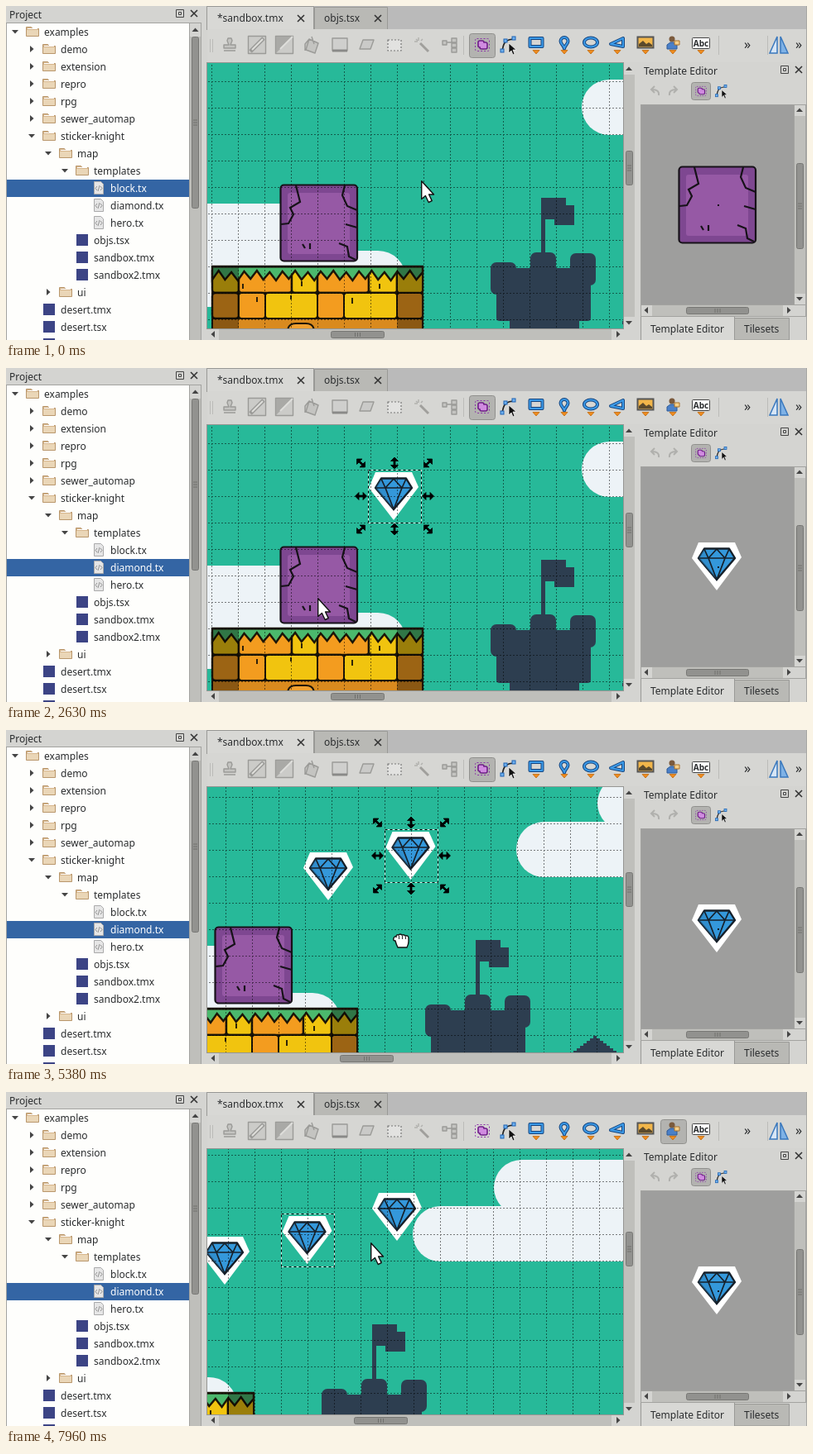
Write an HTML page that moves like this. It is 967x404 px and loops after 8000 ms.

```html
<!DOCTYPE html>
<html lang="en">
<head>
<meta charset="utf-8">
<title>Template drag and drop</title>
<style>
html, body { margin: 0; width: 100%; height: 100%; overflow: hidden; background: #d4d4d1; }
svg { display: block; width: 967px; height: 404px; }
text { font: 12px "Noto Sans", sans-serif; fill: #2a2c2e; white-space: pre; }
</style>
</head>
<body>
<svg id="stage" viewBox="0 0 967 404" xmlns="http://www.w3.org/2000/svg"></svg>
<script>
const LOOP = 8000;
const stage = document.getElementById('stage');

// Markup helpers
const rect = (x, y, w, h, fill, more = '') =>
  `<rect x="${x}" y="${y}" width="${w}" height="${h}" fill="${fill}" ${more}/>`;
const path = (d, fill = 'none', stroke = 'none', width = 1, more = '') =>
  `<path d="${d}" fill="${fill}" stroke="${stroke}" stroke-width="${width}" ${more}/>`;
const text = (x, y, s, more = '') => `<text x="${x}" y="${y}" ${more}>${s}</text>`;
const at = (x, y, body, size = 1) => `<g transform="translate(${x} ${y}) scale(${size})">${body}</g>`;
const tag = (id, body, more = '') => `<g id="${id}" ${more}>${body}</g>`;
const round = r => `rx="${r}"`;
const joined = 'stroke-linejoin="round"';

// Window chrome
const TROUGH = '#bfbfbb', STRIP = '#bababa', IDLE = '#b9b9b5';
const cross = (x, y) => path(`M${x - 4} ${y - 4}l8 8m0-8l-8 8`, 'none', '#333', 1.6);
const floatIcon = (x, y) => path(`M${x - 4.5} ${y - 4.5}h9v9h-9zM${x - 1.5} ${y - 1.5}h3v3h-3z`, 'none', '#444');
const chevron = (x, y, turn) =>
  path('M-4 2L0-2.5L4 2Z', '#444', 'none', 1, `transform="translate(${x} ${y}) rotate(${turn})"`);

function slider(x, y, w, h) {
  const cx = x + w / 2, cy = y + h / 2;
  const grip = [-3, 0, 3].map(d => w > h ? `M${cx + d} ${cy - 2.5}v5` : `M${cx - 2.5} ${cy + d}h5`).join('');
  return rect(x + .5, y + .5, w - 1, h - 1, '#92928f', 'rx="2" stroke="#777774"') + path(grip, 'none', '#70706d');
}

const folder = (x, y) => at(x, y,
  path('M-7.5-5.5h6l1.5 2h7.5v9h-15z', '#d6b68d', '#b9976c') +
  rect(-7, -2, 14, 7, '#ead6b7') + path('M-6-3.5h12', 'none', '#fff'));
const page = (x, y) => at(x, y,
  path('M-5.5-7.5h8l3 3v12h-11z', '#e6e6e6', '#aaa') +
  path('M-2-2l-2 2.5l2 2.5M2-2l2 2.5l-2 2.5M1-3l-2 7', 'none', '#888', .9));
const mapIcon = (x, y) => rect(x - 7, y - 7, 14, 14, '#3c4485');

const rows = [
  [0, 'examples', 'open'], [1, 'demo', 'shut'], [1, 'extension', 'shut'], [1, 'repro', 'shut'],
  [1, 'rpg', 'shut'], [1, 'sewer_automap', 'shut'], [1, 'sticker-knight', 'open'], [2, 'map', 'open'],
  [3, 'templates', 'open'], [4, 'block.tx'], [4, 'diamond.tx'], [4, 'hero.tx'], [3, 'objs.tsx'],
  [3, 'sandbox.tmx'], [3, 'sandbox2.tmx'], [2, 'ui', 'shut'], [1, 'desert.tmx'], [1, 'desert.tsx'], [1, '']
];

function treeRow([level, name, state], i) {
  const y = 31 + 21 * i, x = 32 + 20 * level;
  const icon = state ? folder : name.endsWith('.tx') ? page : mapIcon;
  return (state ? chevron(x - 21, y, state === 'open' ? 180 : 90) : '') +
    icon(x, y) + text(x + 14, y + 4.5, name, `id="row${i}"`);
}

const project =
  text(4, 15, 'Project') + floatIcon(210, 9) + cross(227, 9) +
  rect(0, 20, 236, 390, '#a3a3a0') + rect(1, 21, 220, 390, '#fefefc') +
  rect(1, 210, 220, 21, '#3465a4', 'id="mark"') + rows.map(treeRow).join('') +
  rect(222, 21, 13, 390, TROUGH) + rect(222, 21, 13, 16, '#d4d4d1') +
  chevron(228.5, 29, 0) + slider(224, 37, 9, 208);

// Toolbar icons, centred on 0,0
const drop = path('M-4 6.5h8l-4 4.5z', '#f08c1e', '#c06a10', .8);
const blue = d => path(d, '#d6d6d3', '#15457f', 4, joined) + path(d, 'none', '#3b9ae8', 2, joined);
const selectIcon =
  rect(-8.5, -7.5, 17, 15, 'none', 'rx="2" stroke="#8a2fa8" stroke-dasharray="2 2"') +
  path('M-5-3q0-2 2-2h3q2 0 2 2h2q2 0 2 2v4q0 2-2 2h-5q-2 0-2-2q-2 0-2-2z', '#d08be0', '#6d1f86', 1.6);
const nodeIcon =
  path('M-8 9C-7-4-3-7 8-7', 'none', '#222', 1.6) +
  [[-8, 7], [-4, -5], [6, -8]].map(([x, y]) => rect(x - 2, y - 2, 4, 4, '#6fb1ee', 'stroke="#1e63b4"')).join('') +
  path('M0-2v12l3-3l2 5l2-1l-2-5h4z', '#111', '#fff', .7);
const gray = (d, fill = '#c4c4c1') => path(d, fill, '#9b9b98', 1.4, joined);
const tools = [
  [270, gray('M-2-8h4l1 3l-2 5h6v4h-14v-4h6l-2-5zM-7 7h14')],
  [303, gray('M-10.5-10.5h21v21h-21z', '#cbcbc8') + path('M-8 8L8-8', 'none', '#9b9b98', 5) +
    path('M-6 6L7-7', 'none', '#dededb', 2)],
  [336, gray('M-10.5-10.5h21v21h-21z', '#cbcbc8') + path('M-10 10V-10H10Z', '#a9a9a6') +
    path('M-5 5L10-10', 'none', '#dededb', 2)],
  [370, gray('M-4-7l11 5l-4 12l-11-4zM-4-7l-5 6v8M-1-10l3 9')],
  [403, gray('M-9-8h18v15h-18z', '#cfcfcd') + path('M-9 7h18', 'none', '#8a8a88', 3)],
  [436, gray('M-5-6h13l-4 11h-13z', '#cacac8')],
  [469, path('M-8-6h16v13h-16z', '#e2e2e0', '#777', 1.2, 'stroke-dasharray="2 2"')],
  [502, path('M-2-2L8 8', 'none', '#a09f9c', 3) + path('M-4-9v4M-9-4h4M-7-7l2 2M1-7l-2 2', 'none', '#b2b2af', 1.5)],
  [536, gray('M-9-5h5v5h-5zM2-8h6v5h-6zM2-2h6v5h-6zM2 4h6v5h-6zM-4-3h6')],
  [575, selectIcon], [607, nodeIcon],
  [640, blue('M-7.5-8h15v10h-15z') + drop],
  [674, blue('M0 4.5C-1 0-4.5-1-4.5-4.5a4.5 4.5 0 0 1 9 0C4.5-1 1 0 0 4.5z') + drop],
  [706, blue('M-8-3a8 5.5 0 1 0 16 0a8 5.5 0 1 0-16 0z') + drop],
  [738, blue('M-8-1L7-8v10z') + drop],
  [772, rect(-9.5, -9.5, 19, 13, '#f2b64a', 'stroke="#555" stroke-width="2"') +
    path('M-8 2v-3l5-4l4 4l3-2l4 3v2z', '#5b4a2c') + drop],
  [805, '<circle cx="-1" cy="-7" r="3.5" fill="#7b5a3c"/>' + path('M-7 5v-5l4-3h4l4 3v5z', '#4a80c8', '#2f5a96') +
    path('M2-5h6v5h-6z', '#f5d08a', '#a8702a') + drop],
  [839, rect(-10.5, -8.5, 21, 13, '#fff', 'rx="1" stroke="#444"') +
    text(0, 1.5, 'Abc', 'text-anchor="middle" style="font-size:10px;font-weight:700"') + drop],
  [933, path('M-2-10v20h-9z', '#d7e6f6', '#3a78bd', 1.5) + path('M2-10v20h9z', '#7fb2e6', '#3a78bd', 1.5)]
];
const pressed = (id, x) => rect(x + .5, 33.5, 31, 29, '#b3b3b0', `id="${id}" rx="3" stroke="#90908d"`);

const header =
  rect(242, 0, 725, 28, STRIP) + path('M372.5 28V1.5h88V28', IDLE, '#999996') +
  path('M242 28.5h725', 'none', '#a8a8a5') + path('M242.5 29V.5h129V29', '#d8d8d5', '#999996') +
  rect(243, 28, 724, 40, '#d6d6d3') +
  text(255, 19, '*sandbox.tmx') + cross(356, 15) + text(384, 19, 'objs.tsx') + cross(449, 15) +
  path('M552.5 36v23M860.5 36v23M919.5 36v23M246.5 40v16M249.5 40v16', 'none', '#bbbbb8') +
  pressed('selectOn', 559) + pressed('templateOn', 790) +
  tools.map(([x, body]) => at(x, 47, body)).join('') +
  text(891, 52, '»', 'style="font-size:16px"') + text(953, 52, '»', 'style="font-size:16px"');

// Scene parts
const block =
  rect(331.5, 216.5, 92.5, 92, '#7e4791', 'rx="4" stroke="#171219" stroke-width="2.2"') +
  rect(340, 226, 75, 74, '#9659a5', round(3)) +
  path('M350 217l5 20l-12 7l4 8l-6 11l-9 1M409 217l-3 12l6 13l12 5M410 264l14 4M402 287l10 4l2 12l8 4' +
    'M358 288l3 5M367 287v7', 'none', '#171219', 2.2);

const diamond =
  path('M8 3H52L60 21L30 61L0 22Z', '#fff') +
  path('M15 10.5H45L52 22L30 48L8 22Z', '#3498db', '#16202a', 2.4, joined) +
  path('M15 11L30 48L8 22Z', '#2b83c2', 'none', 1, 'opacity=".5"') +
  path('M8 22H52M15 11l5 11L30 11l10 11l5-11M20 22l10 26l10-26', 'none', '#16202a', 1.7);

function ground() {
  const orange = '#f39c1f', yellow = '#f1c40f', ink = '#1b1508';
  const bricks = (y, edges, colors) => edges.slice(1).map((x, i) =>
    rect(edges[i], y, x - edges[i], 31, colors[i % 2], `rx="4" stroke="${ink}" stroke-width="2.4"`)).join('');
  let teeth = 'M249 331';
  for (let x = 249, i = 0; x < 503; i++) {
    x = Math.min(503, x + 7.7);
    teeth += `L${x} ${i % 2 ? 332 - i % 3 : 320 + i % 3}`;
  }
  return rect(248, 315, 256, 150, ink) +
    bricks(316, [249, 281, 345, 376, 438, 472, 503], [yellow, orange]) +
    rect(473, 317, 29, 29, yellow, round(3)) +
    bricks(347, [249, 281, 313, 376, 408, 472, 503], [yellow, orange].reverse()) +
    rect(282, 348, 30, 29, orange, round(3)) + rect(314, 348, 61, 29, yellow, round(3)) +
    rect(377, 348, 30, 29, orange, round(3)) + rect(409, 348, 62, 29, yellow, round(3)) +
    rect(473, 348, 29, 29, orange, round(3)) +
    rect(249, 379, 254, 90, '#d98a1e') +
    path('M340 394q0-10 10-10h12q10 0 10 10', '#f0a030', ink, 2) +
    path(teeth + 'V315H249Z', '#4bb86d', ink, 2.4) +
    path('M286 336v6M357 333v6M451 336v6M303 352v6M418 353v7M344 350v5', 'none', ink, 1.8) +
    rect(248, 316, 33, 150, '#000', 'opacity=".36"') + rect(472, 316, 32, 150, '#000', 'opacity=".36"') +
    path('M249 500V315.5H503V500', 'none', ink, 2);
}

const tower =
  rect(646, 232, 5, 70, '#2d3e50') + rect(646, 232, 30, 26, '#2d3e50') + rect(662, 241, 24, 24, '#2d3e50') +
  rect(585, 310, 31, 39, '#2d3e50', round(7)) + rect(633, 298, 31, 40, '#2d3e50', round(7)) +
  rect(681, 299, 31, 39, '#2d3e50', round(7)) + rect(592, 317, 114, 64, '#2d3e50', round(4)) +
  rect(608, 370, 84, 80, '#2d3e50');

function hill() {
  let out = '';
  for (let i = 0; i < 12; i++) out += rect(788 - 4 * i, 348 + 3 * i, 4 + 8 * i, 4, '#2d3e50');
  return out;
}

// Dashes start on the tile corners
function grid() {
  let d = '';
  for (let x = 184.5; x < 1000; x += 32) d += `M${x} -37V460`;
  for (let y = -36.5; y < 460; y += 32) d += `M184 ${y}H1000`;
  return path(d, 'none', '#000', 1, 'stroke-opacity=".5" stroke-dasharray="2 2" shape-rendering="crispEdges"');
}

const cloud = (x, y, w, h, r) => rect(x, y, w, h, '#edf3f7', round(r));
const world =
  cloud(793, 33, 400, 67, 33.5) + cloud(695, 89, 400, 67, 33.5) +
  cloud(40, 239, 365, 58, 28) + cloud(100, 296, 383, 68, 34) + rect(100, 280, 240, 40, '#edf3f7') +
  tower + hill() + ground() + block +
  tag('gemA', diamond, 'transform="translate(438 123)"') +
  tag('gemB', diamond, 'transform="translate(537.5 98)"') +
  tag('ghost', diamond) + grid();

// Selection frame around a 64 px object
const doubleArrow = 'M-7 0L-2.5-4.5V-1H2.5V-4.5L7 0L2.5 4.5V1H-2.5V4.5Z';
const turns = [[-1, -1, 45], [0, -1, 90], [1, -1, -45], [-1, 0, 0], [1, 0, 0], [-1, 1, -45], [0, 1, 90], [1, 1, 45]];
const handles = turns.map(([x, y, a]) => path(doubleArrow, '#000', '#000', .8,
  `transform="translate(${32 + 40.5 * x} ${32 + 40 * y}) rotate(${a})"`)).join('');
const frame =
  rect(.5, .5, 64, 64, 'none', 'stroke="#fff" stroke-opacity=".8"') +
  rect(.5, .5, 64, 64, 'none', 'stroke="#000" stroke-dasharray="3 3"') + tag('handles', handles);

const view =
  rect(242, 68, 504, 323, '#969693') +
  `<clipPath id="viewClip">${rect(243, 69, 502, 321, '#000')}</clipPath>` +
  `<g clip-path="url(#viewClip)">${rect(243, 69, 502, 321, '#27b999')}${tag('world', world + tag('frame', frame))}</g>` +
  rect(746, 69, 13, 321, TROUGH) + rect(746, 69, 13, 14, '#d4d4d1') + rect(746, 376, 13, 14, '#d4d4d1') +
  chevron(752, 76, 0) + chevron(752, 383, 180) + tag('vbar', slider(748, 175, 9, 42)) +
  rect(243, 391, 502, 13, TROUGH) + rect(243, 391, 14, 13, '#d4d4d1') + rect(731, 391, 14, 13, '#d4d4d1') +
  chevron(250, 397, -90) + chevron(739, 397, 90) + tag('hbar', slider(392, 393, 65, 9));

const dock =
  text(770, 83, 'Template Editor') + floatIcon(940, 77) + cross(957, 77) +
  path('M788 108q1-7-8-7M783 97l-4 4l4 4', 'none', '#b0b0ad', 2) +
  path('M801 108q-1-7 8-7M806 97l4 4l-4 4', 'none', '#b0b0ad', 2) +
  rect(827.5, 92.5, 23, 21, '#b3b3b0', 'rx="3" stroke="#90908d"') +
  at(839, 103, selectIcon, .75) + at(864, 103, nodeIcon, .75) +
  rect(766, 119, 200, 257, '#a3a3a0') + rect(767, 120, 184, 241, '#9e9e9d') +
  tag('editBlock', block, 'transform="translate(481 -22)"') +
  tag('editGem', diamond, 'transform="translate(828 208)"') + rect(859, 240, 2, 2, '#111') +
  rect(952, 120, 13, 241, TROUGH) + rect(952, 120, 13, 13, '#d4d4d1') + rect(952, 348, 13, 13, '#d4d4d1') +
  chevron(958, 126, 0) + chevron(958, 354, 180) + slider(954, 190, 9, 104) +
  rect(767, 362, 198, 13, TROUGH) + rect(767, 362, 13, 13, '#d4d4d1') + rect(938, 362, 27, 13, '#d4d4d1') +
  chevron(773, 368, -90) + chevron(945, 368, 90) + slider(821, 364, 76, 9) +
  path('M879.5 377.5h66V404h-66z', IDLE, '#999996') + path('M766.5 376v30h113v-30', '#d8d8d5', '#999996') +
  text(778, 395, 'Template Editor') + text(891, 395, 'Tilesets');

// Pointers and the dragged row
const arrow = path('M.7 .7V22.5L5.4 18.5L9.2 26.5L13.2 24.6L9.6 17H15.5Z', '#fff', '#111', 1.4, joined);
const fist = at(-4, -4, path(
  'M3 9Q0 9 1 6Q2 3 4 4Q4 1 7 2Q9 0 11 2Q14 1 15 3Q19 2 19 6V10Q19 13 17 17H6Q4 13 3 9Z', '#fff', '#111', 1.4) +
  path('M7.5 3v4M11.5 3v4M15.5 4v3', 'none', '#111', .9));
const plus = path('M14.5 5.5h4v4h4v4h-4v4h-4v-4h-4v-4h4z', '#fff', '#111', 1.2);
const label = rect(0, 0, 120, 21, '#3465a4', 'opacity=".96"') + page(11, 10) +
  text(25, 14.5, 'diamond.tx', 'style="fill:#fff"');

stage.innerHTML = rect(0, 0, 967, 404, '#d4d4d1') + project + header + view + dock +
  path('M966.5 0V404', 'none', '#a8a8a5') +
  tag('label', label) + tag('arrow', arrow) + tag('fist', fist + tag('plus', plus));

// Pointer tip by time; a trailing 1 marks a place where it rests
const route = [
  [0, 501, 211, 1], [290, 501, 211, 1], [1000, 156, 238, 1], [1570, 156, 238, 1],
  [1580, 180, 234], [1830, 334, 202], [2340, 438, 187, 1], [2400, 438, 187, 1],
  [2760, 320, 325], [3030, 190, 268], [3210, 185, 242, 1], [3240, 185, 242, 1],
  [3250, 191, 241], [3500, 328, 208], [3850, 548, 155], [4040, 540, 163, 1], [4130, 540, 163, 1],
  [4630, 543, 172], [4920, 550, 228, 1], [4950, 550, 228, 1],
  [5380, 471, 250], [5750, 346, 277, 1], [5800, 346, 277, 1], [6580, 782, 66, 1], [6870, 782, 66, 1],
  [7080, 804, 46, 1], [7120, 804, 46, 1], [7670, 470, 185], [7960, 440, 182, 1], [8000, 440, 182, 1]
];

function slope(i, axis) {
  const a = route[i - 1], b = route[i + 1];
  return !a || !b || route[i][3] ? 0 : (b[axis] - a[axis]) / (b[0] - a[0]);
}

function tip(t) {
  const i = Math.max(0, route.findIndex(k => k[0] > t) - 1);
  const a = route[i], b = route[i + 1], span = b[0] - a[0], u = (t - a[0]) / span;
  const s = u * u * (3 - 2 * u);
  return [1, 2].map(axis => a[axis] + (b[axis] - a[axis]) * s +
    span * u * (1 - u) * (slope(i, axis) * (1 - u) - slope(i + 1, axis) * u));
}

const el = id => document.getElementById(id);
const show = (id, on) => { el(id).style.display = on ? '' : 'none'; };
const move = (id, x, y) => el(id).setAttribute('transform', `translate(${x} ${y})`);
const within = (t, a, b) => t >= a && t < b;

function draw(t) {
  const [x, y] = tip(t).map(Math.round);
  const first = within(t, 1580, 2360), second = within(t, 3250, 4130);
  const dragging = first || second, panning = within(t, 4960, 5790);
  const picked = t >= 1290, stamping = t >= 7110;

  el('mark').setAttribute('y', picked ? 231 : 210);
  el('row9').style.fill = picked ? '' : '#fff';
  el('row10').style.fill = picked ? '#fff' : '';
  show('editBlock', t < 1380);
  show('editGem', t >= 1380);

  const [px, py] = t < 4960 ? [0, 0] : tip(Math.min(t, 5750)).map((v, i) => Math.round(v - [550, 228][i]));
  move('world', px, py);
  move('hbar', Math.round(-px * .137), 0);
  move('vbar', 0, Math.round(-py * .125));

  show('gemA', t >= 2360);
  show('gemB', t >= 4130);
  show('frame', t >= 2360);
  move('frame', t < 4130 ? 437 : 536, t < 4130 ? 123 : 98);
  show('handles', !stamping);
  show('selectOn', !stamping);
  show('templateOn', stamping);
  show('ghost', stamping && x < 745 && y > 69);
  move('ghost', x + 2 - px, y - 63 - py);

  show('label', dragging);
  move('label', x - (first ? 55 : 84), y - (first ? 7 : 11));
  show('arrow', !dragging && !panning);
  show('fist', dragging || panning);
  show('plus', dragging);
  move('arrow', x, y);
  move('fist', x, y);
}

function tick() {
  draw(performance.now() % LOOP);
  requestAnimationFrame(tick);
}
tick();
</script>
</body>
</html>
```
